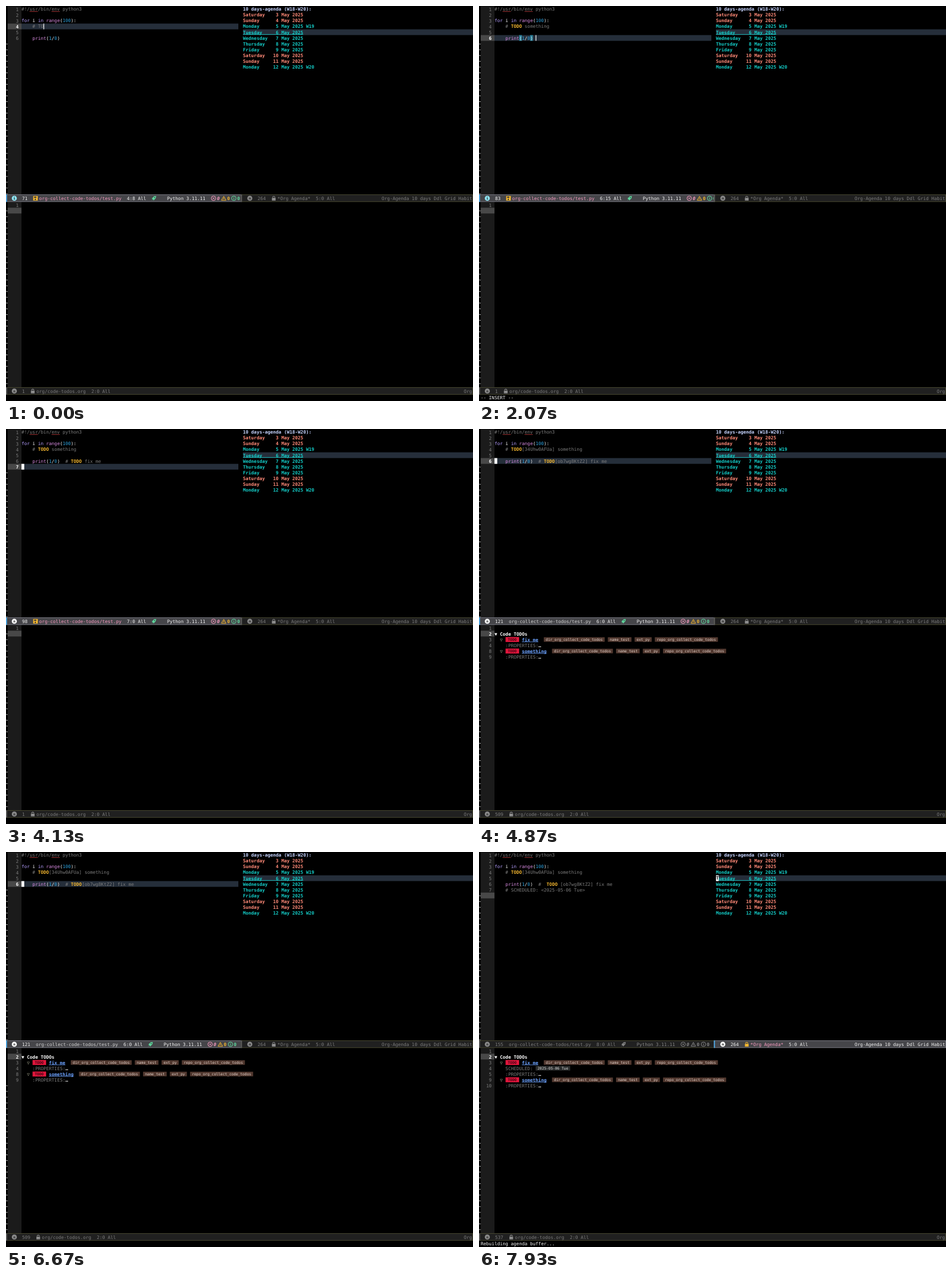
Write an HTML page with a canvas that moves like this. It is 814x688 px and loops after 8000 ms.

```html
<!DOCTYPE html>
<html lang="en">
<head>
<meta charset="utf-8">
<title>Collecting code todos</title>
<style>
html, body { margin: 0; width: 100%; height: 100%; overflow: hidden; background: #000; }
canvas { display: block; width: 814px; height: 688px; }
</style>
</head>
<body>
<canvas id="stage" width="814" height="688"></canvas>
<script>
const ctx = document.getElementById('stage').getContext('2d');
ctx.textRendering = 'geometricPrecision';
const LOOP = 8000, CW = 4.78, ROW = 10.03, LEFT = 27, RIGHT = 413;
const C = {
  fg: '#f4f4f4', dim: '#7c7c7c', gutter: '#1b1b1b', current: '#484848', line: '#252e3a',
  keyword: '#b6a0ff', call: '#d88be0', number: '#2ba3e0', todo: '#f3b62f',
  cyan: '#14cdc8', salmon: '#ff8a78', pink: '#f79ac0', green: '#5fdca0', sky: '#8fe6f5'
};

// Drawing helpers
function rect(x, y, w, h, color) {
  ctx.fillStyle = color;
  ctx.fillRect(x, y, w, h);
}
function text(str, x, y, color = C.fg, bold = false, size = 7.94, italic = false) {
  ctx.font = `${italic ? 'italic ' : ''}${bold ? 'bold ' : ''}${size}px "DejaVu Sans Mono", monospace`;
  ctx.fillStyle = color;
  ctx.fillText(str, x, y + size * 0.365);
  return x + str.length * size * 0.602;
}
function stroke(points, color, width = 1, close = false) {
  ctx.beginPath();
  points.forEach(([x, y]) => ctx.lineTo(x, y));
  if (close) ctx.closePath();
  ctx.strokeStyle = color;
  ctx.lineWidth = width;
  ctx.stroke();
}
function disc(x, y, r, color, outline) {
  ctx.beginPath();
  ctx.arc(x, y, r, 0, Math.PI * 2);
  ctx.fillStyle = ctx.strokeStyle = color;
  ctx.lineWidth = 1;
  outline ? ctx.stroke() : ctx.fill();
}
function badge(x, y, color, letter) {
  disc(x, y, 4.4, color);
  text(letter, x - 1.8, y, '#222', true, 6);
}
function floppy(x, y, color) {
  rect(x - 4, y - 4, 8, 8, color);
  rect(x - 2.5, y - 2.8, 4, 2, '#333');
  disc(x - 0.3, y + 1.8, 1.2, '#333');
}
function lock(x, y, color) {
  rect(x - 3.2, y - 0.8, 6.4, 4.8, color);
  ctx.beginPath();
  ctx.arc(x, y - 1.4, 2, Math.PI, 0);
  ctx.strokeStyle = color;
  ctx.lineWidth = 1.2;
  ctx.stroke();
}
function rocket(x, y, color) {
  ctx.beginPath();
  [[4, -4], [3.2, 0], [0.5, 2.5], [0, 4.2], [-1.5, 1.8], [-4, 4], [-2, 1.2], [-4, 0], [-2, -1], [0, -3.4]]
    .forEach(([dx, dy]) => ctx.lineTo(x + dx, y + dy));
  ctx.fillStyle = color;
  ctx.fill();
  disc(x + 1.2, y - 1.2, 0.9, '#333');
}

// State as a function of time
function stateAt(t) {
  const first = 'TODO something', second = '  # TODO fix me';
  const typed = Math.max(0, Math.min(12, Math.floor((t - 20) / 65)));
  const more = Math.max(0, Math.min(15, Math.floor((t - 2030) / 95) + 1));
  const collected = t >= 4800, scheduled = t >= 7700, calendar = t >= 7000 && !scheduled;
  const s = { collected, scheduled, calendar, echo: '', focus: 'code' };
  s.insert = t < 930 || (t >= 1670 && t < 3530);
  if (t < 1270) [s.row, s.col] = [4, s.insert ? 8 + typed : 19];
  else if (t < 1430) [s.row, s.col] = [5, 0];
  else if (t < 1670) [s.row, s.col] = [6, 13];
  else if (t < 3800) [s.row, s.col] = [6, 14 + more - (s.insert ? 0 : 1)];
  else if (t < 4800) [s.row, s.col] = [7, 0];
  else [s.row, s.col] = [scheduled ? 8 : 6, 0];
  s.parens = t >= 1430 && t < 2130;
  s.size = scheduled ? 155 : collected ? 121 : 71 + typed + Math.max(0, more - (s.insert ? 1 : 0));

  const id = (a) => collected ? `[${a}]` : '';
  s.code = ['#!/usr/bin/env python3', '', 'for i in range(100):',
    '    # ' + (collected ? `TODO${id('34Uhw0AFUa')} something` : first.slice(0, 2 + typed)), '',
    '    print(1/0)' + (scheduled ? `  #  TODO ${id('ob7wg8KtZ2')} fix me`
      : collected ? `  # TODO${id('ob7wg8KtZ2')} fix me` : second.slice(0, more))];
  if (scheduled) s.code.push('    # SCHEDULED: <2025-05-06 Tue>');
  else if (s.row === 7) s.code.push('');

  if (calendar) s.focus = 'calendar';
  else if ((t >= 5530 && t < 6400) || scheduled) s.focus = 'agenda';
  if (t >= 1670 && t < 3530) s.echo = '-- INSERT --';
  if (t >= 5670 && t < 6130) s.echo = 'SPC w l';
  if (t >= 7870) s.echo = 'Rebuilding agenda buffer...';
  return s;
}

// Line numbers, current-line marker and tildes of one window
function gutter(top, bottom, numbers, currentRow) {
  rect(3, top, 24, bottom - top, C.gutter);
  rect(3, top + (currentRow - 1) * ROW, 24, ROW, C.current);
  for (let i = 0, y = top + 5.5; y < bottom; i++, y += ROW) {
    if (i < numbers.length) {
      const label = String(numbers[i]), on = i === currentRow - 1;
      text(label, 22 - label.length * CW, y, on ? '#fff' : C.dim, on);
    } else {
      stroke([[0, y + 0.4], [0.8, y - 0.5], [2, y + 0.6], [3, y - 0.4]], '#d0d0d0', 0.9);
    }
  }
}

function codeLine(line, y) {
  const hash = line.indexOf('#');
  const plain = hash < 0 ? line : line.slice(0, hash);
  let x = LEFT;
  for (const part of plain.match(/\w+|\s+|[^\w\s]/g) || []) {
    const color = /^(for|in)$/.test(part) ? C.keyword : /^(range|print)$/.test(part) ? C.call
      : /^\d/.test(part) ? C.number : C.fg;
    x = text(part, x, y, color);
  }
  if (hash >= 0)
    for (const part of line.slice(hash).split(/(TODO)/))
      x = text(part, x, y, part === 'TODO' ? C.todo : C.dim, part === 'TODO');
}

function wave(x, y, cols) {
  const points = [];
  for (let dx = 0; dx <= cols * CW; dx++) points.push([x + dx, y + (dx % 2 ? 0.5 : -0.5)]);
  stroke(points, '#d84848', 0.9);
}

function codeWindow(s, bottom) {
  gutter(0.5, bottom, s.code.map((_, i) => i + 1), s.row);
  const top = 0.5 + (s.row - 1) * ROW;
  if (!s.scheduled) rect(LEFT, top, 378, ROW, C.line);
  if (s.parens) [9, 13].forEach(c => rect(LEFT + c * CW, top, CW, ROW, '#2a7f98'));
  s.code.forEach((line, i) => codeLine(line, 5.5 + i * ROW));
  wave(LEFT + 3 * CW, 9.6, 3);
  wave(LEFT + 11 * CW, 9.6, 3);
  if (s.focus !== 'code') return;
  const x = LEFT + s.col * CW;
  rect(x, top, s.insert ? 1.2 : CW, ROW, '#fff');
  if (!s.insert) text((s.code[s.row - 1] || '')[s.col] || ' ', x, top + 5, '#000');
}

function agendaWindow(s) {
  const days = ['Saturday', 'Sunday', 'Monday', 'Tuesday', 'Wednesday', 'Thursday', 'Friday'];
  rect(RIGHT, 40.6, 401, ROW, C.line);
  text('10 days-agenda (W18-W20):', RIGHT, 5.5, '#c6d4ff', true);
  for (let i = 0; i < 10; i++) {
    const day = days[i % 7], y = 5.5 + (i + 1) * ROW;
    const week = day === 'Monday' ? ' W' + (i < 7 ? 19 : 20) : '';
    const label = day.padEnd(11) + String(i + 3).padStart(2) + ' May 2025' + week;
    text(label, RIGHT, y, i % 7 < 2 ? C.salmon : C.cyan, true);
  }
  rect(RIGHT, 49, 22 * CW, 0.8, C.cyan);
  if (s.focus === 'agenda') {
    rect(RIGHT, 40.6, CW, ROW, '#fff');
    text('T', RIGHT, 45.6, '#000', true);
  }
}

function modeBar(x, y, w, active) {
  rect(x, y, w, 13, active ? '#454549' : '#202020');
  ctx.strokeStyle = active ? '#75767f' : '#46462f';
  ctx.lineWidth = 1;
  ctx.strokeRect(x + 0.5, y + 0.5, w - 1, 12);
  rect(x, y, 1.8, 13, active ? '#4aa8e8' : '#606060');
}

// Mode badge, buffer size, icon, name and position; returns the end of the text
function modeInfo(x, y, o) {
  const color = o.active ? C.fg : C.dim;
  badge(x, y, o.badge || (o.active ? '#fff' : '#8a8a8a'), o.letter);
  let end = text(String(o.size), x + 13.5, y, color) + 2 * CW;
  if (o.icon) {
    o.icon(end + 4.3, y, o.active ? C.todo : '#8c8c8c');
    end += 10.7;
  }
  end = text(o.name, end, y, o.active ? o.nameColor || C.pink : C.dim);
  return text(o.pos, end + 2 * CW, y, color);
}

function codeMode(s, y) {
  const active = s.focus === 'code', tint = (c) => active ? c : '#868686';
  modeBar(0, y, 411, active);
  y += 6.7;
  ctx.save();
  ctx.beginPath();
  ctx.rect(0, y - 8, 409, 16);
  ctx.clip();
  const end = modeInfo(14.5, y, {
    active, size: s.size, letter: active && s.insert ? 'i' : 'n',
    badge: active && s.insert ? C.sky : '', icon: s.collected ? null : floppy,
    nameColor: s.collected ? '#d0d0d0' : C.pink,
    name: 'org-collect-code-todos/test.py', pos: `${s.row}:${s.col} All`
  });
  rocket(end + 13.5, y, tint(C.green));
  const x = end + 36.5;
  text('Python 3.11.11', x, y, tint(C.fg));
  const [red, amber, green] = [C.pink, C.todo, C.green].map(tint);
  disc(x + 81, y, 3.9, red, true);
  stroke([[x + 79.5, y - 1.5], [x + 82.5, y + 1.5]], red);
  stroke([[x + 82.5, y - 1.5], [x + 79.5, y + 1.5]], red);
  text('0', x + 87, y, red, true, 7.94, true);
  stroke([[x + 98.8, y - 3.5], [x + 102.7, y + 3.4], [x + 94.9, y + 3.4]], amber, 1, true);
  rect(x + 98.3, y - 1, 1, 2.6, amber);
  text('0', x + 104.8, y, amber, true);
  disc(x + 116.4, y, 3.9, green, true);
  rect(x + 115.9, y - 0.6, 1, 2.8, green);
  rect(x + 115.9, y - 2.2, 1, 1, green);
  text('0', x + 122.2, y, green, true);
  ctx.restore();
}

function agendaMode(s, y) {
  const active = s.focus === 'agenda';
  modeBar(409.5, y, 404.5, active);
  y += 6.7;
  modeInfo(425, y, { active, size: 264, letter: 'm', icon: lock, name: '*Org Agenda*', pos: '5:0 All' });
  text('Org-Agenda 10 days Ddl Grid Habit', 654.8, y, active ? C.fg : C.dim);
}

function tags(x, y) {
  for (const tag of ['dir_org_collect_code_todos', 'name_test', 'ext_py', 'repo_org_collect_code_todos']) {
    const w = tag.length * 3.82 + 6.8;
    rect(x, y - 4, w, 8, '#51382f');
    text(tag, x + 3.4, y, '#e2d2ca', false, 6.35);
    x += w + 5.5;
  }
}

function todoWindow(s, top, bottom) {
  const numbers = !s.collected ? [1] : s.scheduled ? [1, 2, 3, 4, 5, 9, 10] : [1, 2, 3, 4, 8, 9];
  gutter(top, bottom, numbers, 2);
  let y = top + 5.3 + ROW;
  if (s.collected) {
    text('▼ Code TODOs', LEFT, y, '#fff', true);
    const indent = LEFT + 4 * CW;
    for (const title of ['fix me', 'something']) {
      y += ROW;
      text('▽', LEFT + 2 * CW, y, '#a0a08a');
      rect(46.3, y - 4.3, 23.6, 8.6, '#e0163c');
      text('TODO', 50.3, y, '#3a0010', true, 6.35);
      const end = text(title, 74.7, y, '#6ca2ff', true);
      rect(74.7, y + 3.8, end - 74.7, 0.8, '#6ca2ff');
      tags(end + 2 * CW, y);
      if (s.scheduled && title === 'fix me') {
        y += ROW;
        text('SCHEDULED:', indent, y, C.dim);
        rect(98.7, y - 4, 60.3, 8, '#2b2d2d');
        text('2025-05-06 Tue', 102, y, '#dedede', false, 6.35);
      }
      y += ROW;
      text('…', text(':PROPERTIES:', indent, y, C.dim), y, C.fg, true);
    }
  }
  modeBar(0, bottom, 814, false);
  modeInfo(14.5, bottom + 6.7, {
    size: s.scheduled ? 537 : s.collected ? 509 : 1, letter: 'n',
    icon: s.calendar ? floppy : lock, name: 'org/code-todos.org', pos: '2:0 All'
  });
  text('Org', 798, bottom + 6.7, C.dim);
}

function calendarWindow() {
  const months = [['April 2025', 2, 30], ['May 2025', 4, 31], ['June 2025', 0, 30]];
  months.forEach(([title, start, length], m) => {
    const x = 27.4 + m * 25 * CW, y = 592.2;
    text(title, x + Math.floor((20 - title.length) / 2) * CW, y, '#fff', true);
    ['Su', 'Mo', 'Tu', 'We', 'Th', 'Fr', 'Sa'].forEach((d, i) =>
      text(d, x + i * 3 * CW, y + ROW, i % 6 ? C.cyan : C.salmon));
    for (let d = 1; d <= length; d++) {
      const cell = start + d - 1, today = m === 1 && d === 6;
      const dx = x + (cell % 7) * 3 * CW, dy = y + (2 + Math.floor(cell / 7)) * ROW;
      if (today) rect(dx, dy - 5, 2 * CW, ROW, '#10d0cc');
      text(String(d).padStart(2), dx, dy, today ? '#063838' : C.fg);
    }
  });
  rect(0, 666, 814, 11.5, '#454547');
  rect(0, 666, 814, 1, '#707074');
  [['<', 18.2], ['Calendar', 47.2], ['? info / o other / . today', 109.7], ['Tue, May 6, 2025', 262.8], ['>', 367.7]]
    .forEach(([label, x]) => text(label, x, 671.8));
}

function draw(t) {
  const s = stateAt(t), shift = s.calendar ? 50.2 : 0;
  const split = 328.2 - shift, bottom = s.calendar ? 573.6 : 664;
  rect(0, 0, 814, 688, '#000');
  codeWindow(s, split);
  agendaWindow(s);
  todoWindow(s, split + 13.1, bottom);
  codeMode(s, split);
  agendaMode(s, split);
  if (s.calendar) calendarWindow();
  text(s.echo, 3, 682.5);
}

function frame(now) {
  draw(now % LOOP);
  requestAnimationFrame(frame);
}
requestAnimationFrame(frame);
</script>
</body>
</html>
```
